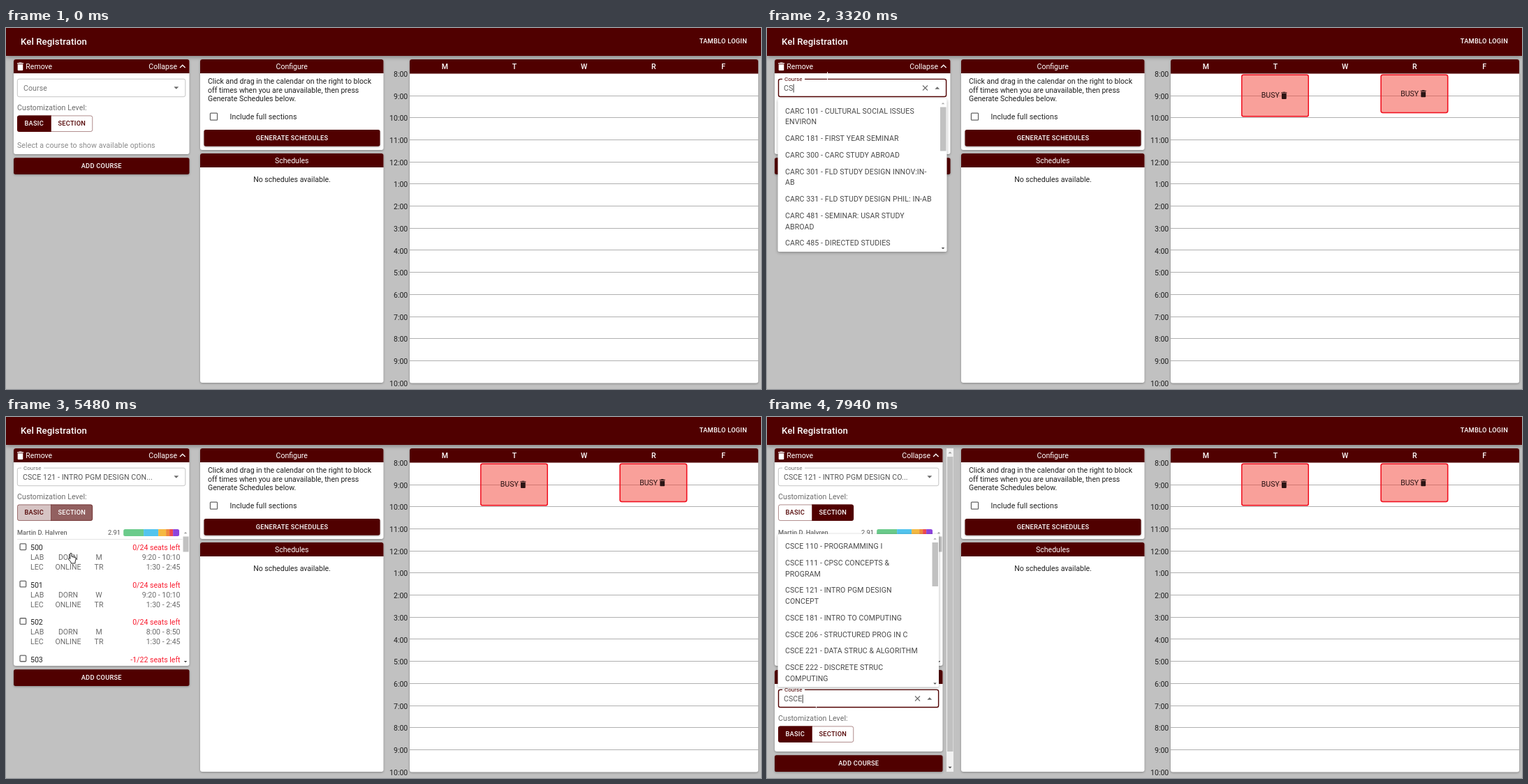
These frames come from a looping animation (1081 px wide and 518 px high, 8 s). An HTML page with a canvas:

```html
<!DOCTYPE html>
<html lang="en">
<head>
<meta charset="utf-8">
<title>Course registration</title>
<style>
  html, body { margin: 0; width: 100%; height: 100%; overflow: hidden; background: #c1c1c1; }
  canvas { display: block; }
</style>
</head>
<body>
<canvas id="stage" width="1081" height="518"></canvas>
<script>
const LOOP = 8000, MAROON = '#500000', GREY = '#6b6b6b', BODY = 10.56, SMALL = 9.24;
const ctx = document.getElementById('stage').getContext('2d');
const COURSE = 'CSCE 121 - INTRO PGM DESIGN CONCEPT';
const CARC = [
  'CARC 101 - CULTURAL SOCIAL ISSUES|ENVIRON', 'CARC 181 - FIRST YEAR SEMINAR',
  'CARC 300 - CARC STUDY ABROAD', 'CARC 301 - FLD STUDY DESIGN INNOV:IN-|AB',
  'CARC 331 - FLD STUDY DESIGN PHIL: IN-AB', 'CARC 481 - SEMINAR: USAR STUDY|ABROAD',
  'CARC 485 - DIRECTED STUDIES'];
const CSCE = [
  'CSCE 110 - PROGRAMMING I', 'CSCE 111 - CPSC CONCEPTS &|PROGRAM',
  'CSCE 121 - INTRO PGM DESIGN|CONCEPT', 'CSCE 181 - INTRO TO COMPUTING',
  'CSCE 206 - STRUCTURED PROG IN C', 'CSCE 221 - DATA STRUC & ALGORITHM',
  'CSCE 222 - DISCRETE STRUC|COMPUTING'];
const SECTIONS = [
  ['500', 'M', '9:20 - 10:10', '0/24'], ['501', 'W', '9:20 - 10:10', '0/24'],
  ['502', 'M', '8:00 - 8:50', '0/24'], ['503', 'W', '8:00 - 8:50', '-1/22']];
const GRADES = [['#6bcb8b', 29], ['#52c4ee', 21], ['#f5b942', 11], ['#f08a3c', 5], ['#ee4a4f', 5], ['#8e44dd', 9]];

// Pointer: time, x, y, shape from then on
const POINTER = [
  [0, 15, -10, 'beam'], [100, 15, -10, 'arrow'], [800, 726, 137, 'arrow'], [920, 726, 137, 'arrow'],
  [1040, 726, 127, 'arrow'], [1220, 726, 127, 'arrow'], [1560, 726, 16, 'arrow'], [1640, 726, 18, 'arrow'],
  [2000, 921, 127, 'arrow'], [2180, 921, 127, 'arrow'], [2260, 921, 122, 'arrow'], [2320, 921, 122, 'arrow'],
  [2600, 921, 10, 'arrow'], [2660, 921, 10, 'arrow'], [2900, 86, 69, 'beam'], [3760, 86, 69, 'arrow'],
  [3920, 100, 189, 'hand'], [4060, 100, 189, 'hand'], [4340, 100, 131, 'hand'], [5360, 100, 131, 'hand'],
  [5480, 93, 195, 'hand'], [5940, 93, 195, 'hand'], [6140, 93, 245, 'hand'], [6240, 93, 245, 'hand'],
  [6320, 80, 296, 'hand'], [6420, 80, 296, 'hand'], [6660, 120, 367, 'hand'], [6800, 120, 367, 'arrow'],
  [7200, 70, 412, 'beam'], [LOOP, 70, 412, 'beam']];

const clamp = v => Math.max(0, Math.min(1, v));

function pointerAt(t) {
  const i = Math.max(1, POINTER.findIndex(k => k[0] > t));
  const [t0, x0, y0, shape] = POINTER[i - 1], [t1, x1, y1] = POINTER[i];
  const p = clamp((t - t0) / (t1 - t0)), e = p * p * (3 - 2 * p);
  return { x: x0 + (x1 - x0) * e, y: y0 + (y1 - y0) * e, shape };
}

// y is the middle of the capitals
function text(s, x, y, { size = BODY, color = '#212121', align = 'left', weight = 400, gap = 0 } = {}) {
  ctx.font = `${weight} ${size}px Roboto, sans-serif`;
  ctx.letterSpacing = gap + 'px';
  ctx.textAlign = align;
  ctx.fillStyle = color;
  ctx.fillText(s, x, y + size * 0.355);
}
const label = (s, x, y, color, align = 'center', weight = 500) =>
  text(s, x, y, { size: SMALL, weight, color, align, gap: 0.26 });

function box(x, y, w, h, fill, r = 0, shadow = 0) {
  ctx.save();
  if (shadow) {
    ctx.shadowColor = 'rgba(0,0,0,.32)';
    ctx.shadowBlur = shadow;
    ctx.shadowOffsetY = shadow / 3;
  }
  ctx.fillStyle = fill;
  ctx.beginPath();
  ctx.roundRect(x, y, w, h, r);
  ctx.fill();
  ctx.restore();
}

// Border drawn inside the given box
function frame(x, y, w, h, color, width, r = 2.6) {
  ctx.strokeStyle = color;
  ctx.lineWidth = width;
  ctx.beginPath();
  ctx.roundRect(x + width / 2, y + width / 2, w - width, h - width, r);
  ctx.stroke();
}

function line(points, color, width, dash = []) {
  ctx.strokeStyle = color;
  ctx.lineWidth = width;
  ctx.setLineDash(dash);
  ctx.beginPath();
  points.forEach(([x, y]) => ctx.lineTo(x, y));
  ctx.stroke();
  ctx.setLineDash([]);
}

function clipped(x, y, w, h, draw) {
  ctx.save();
  ctx.beginPath();
  ctx.rect(x, y, w, h);
  ctx.clip();
  draw();
  ctx.restore();
}

function triangle(x, y, w, up, color = '#6b6b6b') {
  const h = (up ? -w : w) / 4;
  ctx.fillStyle = color;
  ctx.beginPath();
  ctx.moveTo(x - w / 2, y - h);
  ctx.lineTo(x + w / 2, y - h);
  ctx.lineTo(x, y + h);
  ctx.fill();
}

function trash(x, y, h, color) {
  box(x, y + h * 0.06, h * 0.78, h * 0.11, color);
  box(x + h * 0.22, y, h * 0.34, h * 0.1, color);
  box(x + h * 0.06, y + h * 0.23, h * 0.66, h * 0.77, color, [0, 0, 1, 1]);
}

function panel(x, y, w, h, title) {
  box(x, y, w, h, '#fff', 3, 3);
  box(x, y, w, 20, MAROON, [3, 3, 0, 0]);
  if (title) text(title, x + w / 2, y + 10.3, { color: '#fff', align: 'center' });
}

function button(s, x, y, w) {
  box(x, y, w, 23.7, MAROON, 2.6, 3);
  label(s, x + w / 2, y + 11.7, '#fff');
}

function checkbox(x, y, size, on) {
  if (!on) return frame(x, y, size, size, '#666', 1.3, 1);
  box(x, y, size, size, MAROON, 1);
  line([[x + 1.8, y + size * 0.5], [x + size * 0.4, y + size * 0.74], [x + size - 1.5, y + size * 0.24]], '#fff', 1.3);
}

function ellipsis(s, width) {
  ctx.font = `400 ${BODY}px Roboto, sans-serif`;
  ctx.letterSpacing = '0.1px';
  while (ctx.measureText(s + '...').width > width) s = s.slice(0, -1);
  return s + '...';
}

function courseField(y, right, f) {
  const shrunk = f.value || f.focus;
  frame(15.8, y + 0.2, right - 16, 26.5, f.focus ? MAROON : '#c4c4c4', f.focus ? 1.4 : 1);
  if (shrunk) {
    box(22, y - 1, 32, 3, '#fff');
    text('Course', 25, y + 0.6, { size: 7.92, color: f.focus ? MAROON : GREY, gap: 0.08 });
  } else text('Course', 25, y + 13.5, { color: '#757575', gap: 0.1 });
  if (f.value) {
    const shown = f.focus ? f.value : ellipsis(f.value, right - 66);
    clipped(22, y, right - 67, 27, () => text(shown, 24, y + 14, { color: '#555', gap: 0.1 }));
  }
  if (f.open) {
    ctx.font = `400 ${BODY}px Roboto, sans-serif`;
    ctx.letterSpacing = '0.1px';
    box(24.3 + ctx.measureText(f.value).width, y + 8, 0.9, 12, '#222');
  }
  if (f.focus && f.value) {
    const x = right - 31, m = y + 13.5;
    line([[x - 3.5, m - 3.5], [x + 3.5, m + 3.5]], '#6b6b6b', 1.1);
    line([[x + 3.5, m - 3.5], [x - 3.5, m + 3.5]], '#6b6b6b', 1.1);
  }
  triangle(right - 13.7, y + 13.5, 6.8, f.open);
}

// p runs from BASIC (0) to SECTION (1)
function levelToggle(y, p) {
  const half = (x, w, r, a, s) => {
    box(x, y, w, 23.5, `rgba(80,0,0,${a})`, r);
    label(s, x + w / 2, y + 11.7, a > 0.5 ? '#fff' : MAROON);
  };
  half(16, 48.5, [3, 0, 0, 3], (1 - p) ** 1.5, 'BASIC');
  half(64.5, 59.5, [0, 3, 3, 0], p, 'SECTION');
  frame(16, y, 108.2, 23.5, 'rgba(80,0,0,.5)', 0.9);
  box(64, y, 1, 23.5, 'rgba(80,0,0,.5)');
}

function courseCard(y, width, h, f) {
  const right = 11 + width;
  panel(11, y, width, h);
  trash(16, y + 4.5, 11.5, '#fff');
  text('Remove', 28.3, y + 10.5, { color: '#fff' });
  text('Collapse', right - 17.5, y + 10.5, { color: '#fff', align: 'right' });
  line([[right - 13.5, y + 12], [right - 9.7, y + 8.2], [right - 5.9, y + 12]], '#fff', 1.3);
  courseField(y + 27.5, right - 5, f);
  text('Customization Level:', 16, y + 69.7, { color: GREY, gap: 0.1 });
  levelToggle(y + 80.5, f.level);
}

function ripple(row, age, right) {
  if (age < 0 || age > 400) return;
  const top = 229 + row * 53.4 - 53.4, e = 1 - clamp(age / 280);
  clipped(16, top, right - 26, 53.2, () => {
    ctx.fillStyle = `rgba(0,0,0,${0.137 * clamp((400 - age) / 200)})`;
    ctx.beginPath();
    ctx.arc(94, top + 16, 210 * (1 - e * e), 0, 7);
    ctx.fill();
  });
}

function sectionList(t, right) {
  text('Martin D. Halvren', 16, 166, { size: SMALL, weight: 500, color: GREY });
  text('2.91', right - 98.5, 165.5, { size: SMALL, color: '#555', align: 'right' });
  ctx.save();
  ctx.beginPath();
  ctx.roundRect(right - 94.4, 161, 80, 10, 2.5);
  ctx.clip();
  let x = right - 94.4;
  for (const [color, w] of GRADES) {
    box(x, 161, w, 10, color);
    x += w;
  }
  ctx.restore();
  box(16, 175, right - 26, 0.8, '#ddd');
  clipped(11, 176, right - 11, 181, () => {
    ripple(0, t - 5880, right);
    ripple(1, t - 6200, right);
    SECTIONS.forEach(([id, day, time, seats], i) => {
      const y = 187.7 + i * 53.4, end = { color: GREY, align: 'right' };
      checkbox(19.4, y - 6.4, 9.9, i < 2 && t >= [5880, 6200][i]);
      text(id, 35, y);
      text(seats + ' seats left', right - 13, y, { color: '#f91c2f', align: 'right' });
      [['LAB', 'DORN', day, time], ['LEC', 'ONLINE', 'TR', '1:30 - 2:45']].forEach(([kind, place, d, hours], j) => {
        const row = y + 14 + j * 13.8;
        text(kind, 35, row, { color: GREY });
        text(place, 89, row, { color: GREY, align: 'center' });
        text(d, 133, row, { color: GREY, align: 'center' });
        text(hours, right - 13, row, end);
      });
    });
  });
  triangle(right - 5.5, 166, 4.5, true, '#999');
  triangle(right - 5.5, 351, 4.5, false, '#444');
  box(right - 9, 171.5, 8, 22, '#c1c1c1');
}

function dropdown(y, right, items) {
  box(15.5, y, right - 15.5, 219.5, '#fff', 2.6, 4);
  let row = y + 17.3;
  clipped(15, y, right - 15, 219, () => {
    for (const item of items) {
      item.split('|').forEach((s, i) => text(s, 26, row + i * 15.8, { color: '#484848', gap: 0.1 }));
      row += item.includes('|') ? 39.5 : 23.75;
    }
  });
  triangle(right - 5.5, y + 6.5, 4.5, true, '#aaa');
  triangle(right - 5.5, y + 214.5, 4.5, false, '#444');
  box(right - 9.5, y + 12, 8.5, 63, '#c1c1c1');
}

function loading(t) {
  const frozen = t < 4760 ? t : Math.max(4760, t - 240);
  const a = -0.5 + (frozen - 4520) / 700 * Math.PI * 2;
  ctx.strokeStyle = MAROON;
  ctx.lineWidth = 1.9;
  ctx.beginPath();
  ctx.arc(139.3, 168, 7.4, a, a + 3.6);
  ctx.stroke();
  text('Loading sections...', 139, 182.3, { align: 'center', gap: 0.1 });
}

const typed = (t, times) => 'CSCE'.slice(0, times.filter(k => t >= k).length);

function coursesColumn(t) {
  const added = t >= 6800, width = added ? 240.5 : 251.5, right = 11 + width;
  const chosen = t >= 4000, loaded = t >= 5400;
  const first = {
    value: chosen ? COURSE : typed(t, [3200, 3290, 3420, 3510]),
    focus: t >= 2980 && !loaded,
    open: t >= 3140 && !chosen,
    level: clamp((t - 5400) / 130)
  };
  const bottom = loaded ? 357 : chosen ? 193.5 : 181;
  courseCard(45, width, bottom - 45, first);
  if (loaded) sectionList(t, right);
  else if (chosen) loading(t);
  else text('Select a course to show available options', 16, 168, { color: '#8a8a8a', gap: 0.1 });
  button('ADD COURSE', 11, added ? 485.3 : bottom + 5.2, width);
  if (first.open) dropdown(101.5, right - 5, t < 3560 ? CARC : CSCE);
  if (!added) return;

  const second = { value: typed(t, [7560, 7660, 7760, 7860]), focus: t >= 7260, open: t >= 7380, level: 0 };
  courseCard(363, width, 117, second);
  if (second.open) dropdown(168, right - 5.5, t < 7760 ? CARC : CSCE);
  box(257, 45, 10, 464, '#f1f1f1');
  box(258, 57, 8.5, 423, '#c1c1c1');
  triangle(262, 51, 5, true, '#999');
  triangle(262, 503, 5, false, '#444');
}

function configureColumn() {
  panel(278, 45, 262.5, 130, 'Configure');
  ['Click and drag in the calendar on the right to block', 'off times when you are unavailable, then press',
    'Generate Schedules below.'].forEach((s, i) => text(s, 289, 76.5 + i * 12.6));
  checkbox(291.8, 121.4, 11.4, false);
  text('Include full sections', 320.5, 127, { gap: 0.1 });
  button('GENERATE SCHEDULES', 283.5, 146, 252);
  panel(278, 180, 262.5, 329, 'Schedules');
  text('No schedules available.', 409.5, 217, { align: 'center' });
}

const STEP = 31.7 / 6, slotAt = y => Math.max(0, Math.round((y - 65.5) / STEP));
const columnX = i => 578 + i * 99.7;

function busy(column, bottom, top) {
  if (bottom - top < 2) return;
  const x = columnX(column) + 1.3, mid = (top + bottom) / 2;
  box(x, top, 97, bottom - top, 'rgba(244,67,54,.5)', 3);
  frame(x, top, 97, bottom - top, '#f01020', 1.5);
  if (bottom - top < 14) return;
  text('BUSY', x + 28.8, mid - 0.4, { color: '#2b1414' });
  trash(x + 57.3, mid - 5.3, 10.3, '#2b1414');
}

function hoverTime({ x, y }) {
  const column = Math.floor((x - 578) / 99.7), slot = slotAt(y);
  if (column < 0 || column > 4 || y < 66) return;
  const left = columnX(column) + 1, at = 64 + slot * STEP, mid = left + 48.5;
  const hour = (Math.floor(slot / 6) + 7) % 12 + 1;
  line([[left, at], [left + 97.5, at]], '#333', 1, [4, 2.6]);
  box(mid - 14.5, at - 7.5, 29, 15, '#fff', 1);
  frame(mid - 14.5, at - 7.5, 29, 15, MAROON, 1.5, 1);
  text(`${hour}:${slot % 6}0`, mid, at + 0.3, { size: 8.4, align: 'center' });
}

function calendar(t, pointer) {
  box(578, 45, 499, 464.5, '#fff', 3, 3);
  box(578, 45, 499, 20.5, MAROON, [3, 3, 0, 0]);
  [...'MTWRF'].forEach((d, i) => text(d, columnX(i) + 50.3, 55.2, { color: '#fff', align: 'center', weight: 500 }));
  for (let i = 0; i < 15; i++) {
    const y = 65.5 + i * 31.7;
    text(`${(i + 7) % 12 + 1}:00`, 575.3, y + 0.7, { align: 'right' });
    if (i && i < 14) box(578, Math.round(y - 0.65), 499, 1, '#b0b0b0');
  }
  const block = (column, start, end, bottom) => {
    if (t < start) return;
    const top = t < end ? 64 + slotAt(pointer.y) * STEP : 0;
    busy(column, bottom, Math.max(66.5, top));
  };
  block(1, 1220, 1600, 127.5);
  block(3, 2320, 2640, 122.2);
  const dragging = (t >= 1220 && t < 1600) || (t >= 2320 && t < 2640);
  if (!dragging) hoverTime(pointer);
}

const SHAPES = {
  arrow: 'M0 0V11.2L2.6 8.8L4.3 12.6L6 11.8L4.4 8.2H8Z',
  hand: 'M-1.2 1Q0-.6 1.2 1V5.3L6 6.5Q7.2 7 7 9L6 13V15H0V13.2L-3.6 9Q-4-.2 -3.4 8Q-2.6 7-1.2 8.6Z'.replace('Q-4-.2 -3.4 8', 'L-3.4 8')
};

function drawPointer({ x, y, shape }) {
  if (shape === 'beam') return box(x, y - 6, 1, 11, '#fff');
  const path = new Path2D(SHAPES[shape]);
  ctx.save();
  ctx.translate(x, y);
  ctx.fillStyle = '#fff';
  ctx.strokeStyle = '#111';
  ctx.lineWidth = 0.9;
  ctx.fill(path);
  ctx.stroke(path);
  ctx.restore();
}

function draw(t) {
  const pointer = pointerAt(t);
  box(0, 0, 1081, 518, '#c1c1c1');
  box(0, 0, 1081, 40, MAROON, 0, 6);
  text('Kel Registration', 21, 19.5, { size: 13.2, weight: 500, color: '#fff', gap: 0.1 });
  label('TAMBLO LOGIN', 1061, 18.7, '#fff', 'right');
  coursesColumn(t);
  configureColumn();
  calendar(t, pointer);
  drawPointer(pointer);
}

const begin = performance.now();
function tick() {
  draw((performance.now() - begin) % LOOP);
  requestAnimationFrame(tick);
}
tick();
</script>
</body>
</html>
```
